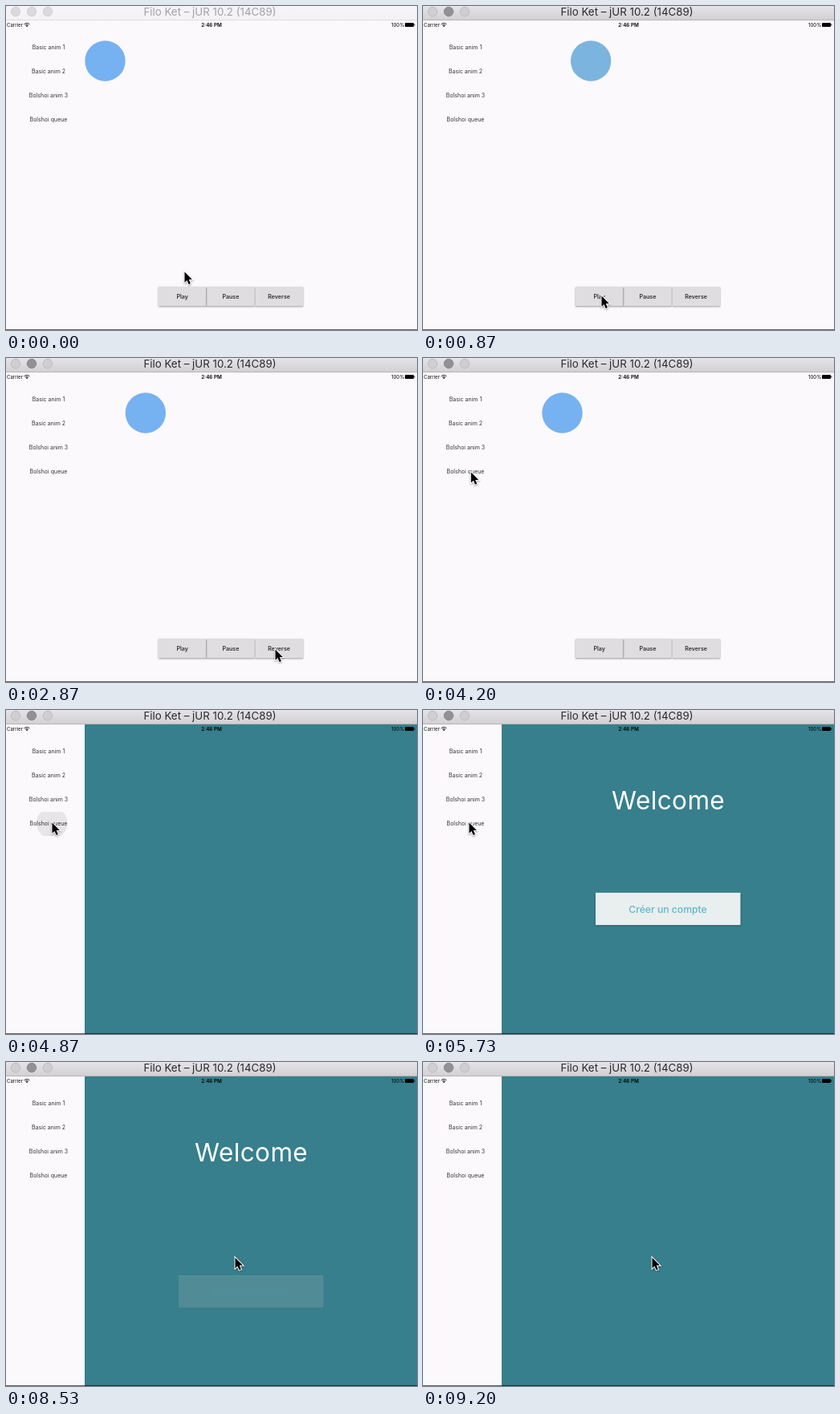
An HTML page with a canvas for the animation above (9670 ms loop, 512 px wide and 404 px high).

```html
<!DOCTYPE html>
<html lang="en">
<head>
<meta charset="utf-8">
<title>Animation demo</title>
<style>
  html, body { margin: 0; width: 100%; height: 100%; overflow: hidden; background: #fbf9fc; }
  canvas { display: block; }
</style>
</head>
<body>
<canvas id="stage" width="512" height="404"></canvas>
<script>
const ctx = document.getElementById('stage').getContext('2d');
const LOOP = 9670;
const FRAME = LOOP / 145;
const STEP = 500;
const ACTIVATE = 660, PLAY = 690, REVERSE = 2405, QUEUE = 4860, ENTER = 4880, LEAVE = 7700;
const BLUE = [118, 177, 241], GREEN = [147, 196, 140];

const clamp = v => Math.max(0, Math.min(1, v));
const mix = (a, b, p) => a + (b - a) * p;
const ease = p => p < .5 ? 4 * p ** 3 : 1 - 4 * (1 - p) ** 3;
const progress = (t, start, length = STEP) => ease(clamp((t - start) / length));

// Pointer legs: start time, end time, destination
const legs = [
  [0, 330, 222.5, 361.5],
  [1000, 1600, 326.5, 371.5],
  [1600, 2000, 335.5, 363.5],
  [3330, 4330, 57.5, 140.5],
  [6800, 7700, 285.5, 244]
];

function text(str, x, y, size, color, weight = 400, align = 'center') {
  ctx.font = `${weight} ${size}px Inter, sans-serif`;
  ctx.textAlign = align;
  ctx.fillStyle = color;
  ctx.fillText(str, x, y + size * .364);
}

function rect(x, y, w, h, color) {
  ctx.fillStyle = color;
  ctx.fillRect(x, y, w, h);
}

function disc(x, y, r, fill, stroke) {
  ctx.beginPath();
  ctx.arc(x, y, r, 0, Math.PI * 2);
  ctx.fillStyle = fill;
  ctx.fill();
  if (stroke) {
    ctx.lineWidth = .8;
    ctx.strokeStyle = stroke;
    ctx.stroke();
  }
}

function raised(x, y, w, h, color) {
  ctx.save();
  ctx.shadowColor = 'rgba(0,0,0,.4)';
  ctx.shadowBlur = 2;
  ctx.shadowOffsetY = 1;
  rect(x, y, w, h, color);
  ctx.restore();
}

function titleBar(active) {
  const shade = ctx.createLinearGradient(0, 0, 0, 17);
  shade.addColorStop(0, active ? '#e6e4e6' : '#f6f4f6');
  shade.addColorStop(1, active ? '#d2d0d2' : '#f4f2f4');
  rect(0, 0, 512, 17, shade);
  rect(0, 17, 512, 1, active ? '#b7b5b7' : '#dddbdd');
  [12, 32, 52].forEach((x, i) => {
    if (active && i === 1) disc(x, 7, 5.8, '#929092', '#858385');
    else disc(x, 7, 5.8, active ? '#d0ced0' : '#dbd9db', active ? '#b9b7b9' : '#cecccE');
  });
  text('Filo Ket – jUR 10.2 (14C89)', 254, 7.2, 13.3, active ? '#2b292b' : '#a3a1a3');
}

function statusBar() {
  text('Carrier', 1, 23.5, 6.1, '#111', 400, 'left');
  text('2:46 PM', 256, 23.5, 6.3, '#000', 600);
  text('100%', 480, 23.5, 6.1, '#000', 400, 'left');
  ctx.strokeStyle = '#222';
  ctx.lineWidth = 1;
  for (const r of [2.6, 4.6]) {
    ctx.beginPath();
    ctx.arc(26, 26, r, -Math.PI * .77, -Math.PI * .23);
    ctx.stroke();
  }
  disc(26, 25.2, .9, '#222');
  ctx.fillStyle = '#000';
  ctx.beginPath();
  ctx.roundRect(497, 21, 11, 5, 1);
  ctx.fill();
  rect(508.4, 22.5, .9, 2, '#000');
}

function menu(t) {
  const fade = 1 - clamp((t - QUEUE) / 330);
  if (t >= QUEUE && fade > 0) {
    ctx.save();
    ctx.beginPath();
    ctx.rect(8, 127, 90, 30);
    ctx.clip();
    ctx.globalAlpha = fade;
    disc(57.3, 141, 19.3, '#e7e5e8');
    ctx.restore();
  }
  ['Basic anim 1', 'Basic anim 2', 'Bolshoi anim 3', 'Bolshoi queue']
    .forEach((label, i) => text(label, 53, 51.2 + i * 30.2, 7, '#333'));
}

function ballScene(t) {
  const p = progress(t, PLAY) - progress(t, REVERSE);
  const x = t < PLAY ? 123.5 : mix(173.5, 374.5, p);
  disc(x, 68.5, 25.2, `rgb(${BLUE.map((c, i) => Math.round(mix(c, GREEN[i], p)))})`);
  ['Play', 'Pause', 'Reverse'].forEach((label, i) => {
    raised(190 + i * 60.3, 350, 59.5, 24, '#dfdddf');
    text(label, 219.7 + i * 60.2, 362, 7.1, '#333', 600);
  });
}

// Items enter in order and leave in reverse order.
function welcomeScene(t) {
  rect(98, 18, 414, 386, '#377f8c');
  const items = [
    () => {
      ctx.letterSpacing = '0.4px';
      text('Welcome', 305.6, 113, 31.5, '#fff');
    },
    () => {
      raised(215, 223, 180.5, 40.3, '#fff');
      text('Créer un compte', 305, 243.3, 12.2, '#4cb3c6', 500);
    },
    () => {
      rect(215, 303.5, 180.5, 40.3, 'rgba(160,255,255,.14)');
      text('Se connecter', 305, 323.3, 16.1, '#fff', 500);
    }
  ];
  items.forEach((draw, i) => {
    const p = progress(t, ENTER + i * STEP) - progress(t, LEAVE + (2 - i) * STEP);
    if (p <= 0) return;
    ctx.save();
    ctx.globalAlpha = p;
    ctx.translate(0, 50 * (1 - p));
    draw();
    ctx.restore();
  });
}

function pointer(t) {
  let x = 222.5, y = 331.5;
  for (const [start, end, toX, toY] of legs) {
    const p = progress(t, start, end - start);
    x = mix(x, toX, p);
    y = mix(y, toY, p);
  }
  ctx.save();
  ctx.translate(x, y);
  const shape = new Path2D('M0 0V13.2L3 10.4L5.1 15.4L7.4 14.4L5.3 9.5H9.4Z');
  ctx.shadowColor = 'rgba(0,0,0,.35)';
  ctx.shadowBlur = 2;
  ctx.shadowOffsetY = 1;
  ctx.lineWidth = 2;
  ctx.strokeStyle = '#fff';
  ctx.stroke(shape);
  ctx.shadowColor = 'transparent';
  ctx.fillStyle = '#000';
  ctx.fill(shape);
  ctx.restore();
}

function draw(now) {
  // Hold each pose for one frame; the offset absorbs 10 ms clock rounding.
  const t = Math.floor((now % LOOP) / FRAME + .15) * FRAME;
  rect(0, 0, 512, 404, '#fbf9fc');
  if (t < QUEUE) ballScene(t);
  else welcomeScene(t);
  menu(t);
  titleBar(t >= ACTIVATE);
  statusBar();
  rect(0, 403, 512, 1, 'rgba(0,0,0,.6)');
  pointer(t);
}

const origin = performance.now();
function tick() {
  draw(performance.now() - origin);
  requestAnimationFrame(tick);
}
tick();
</script>
</body>
</html>
```
